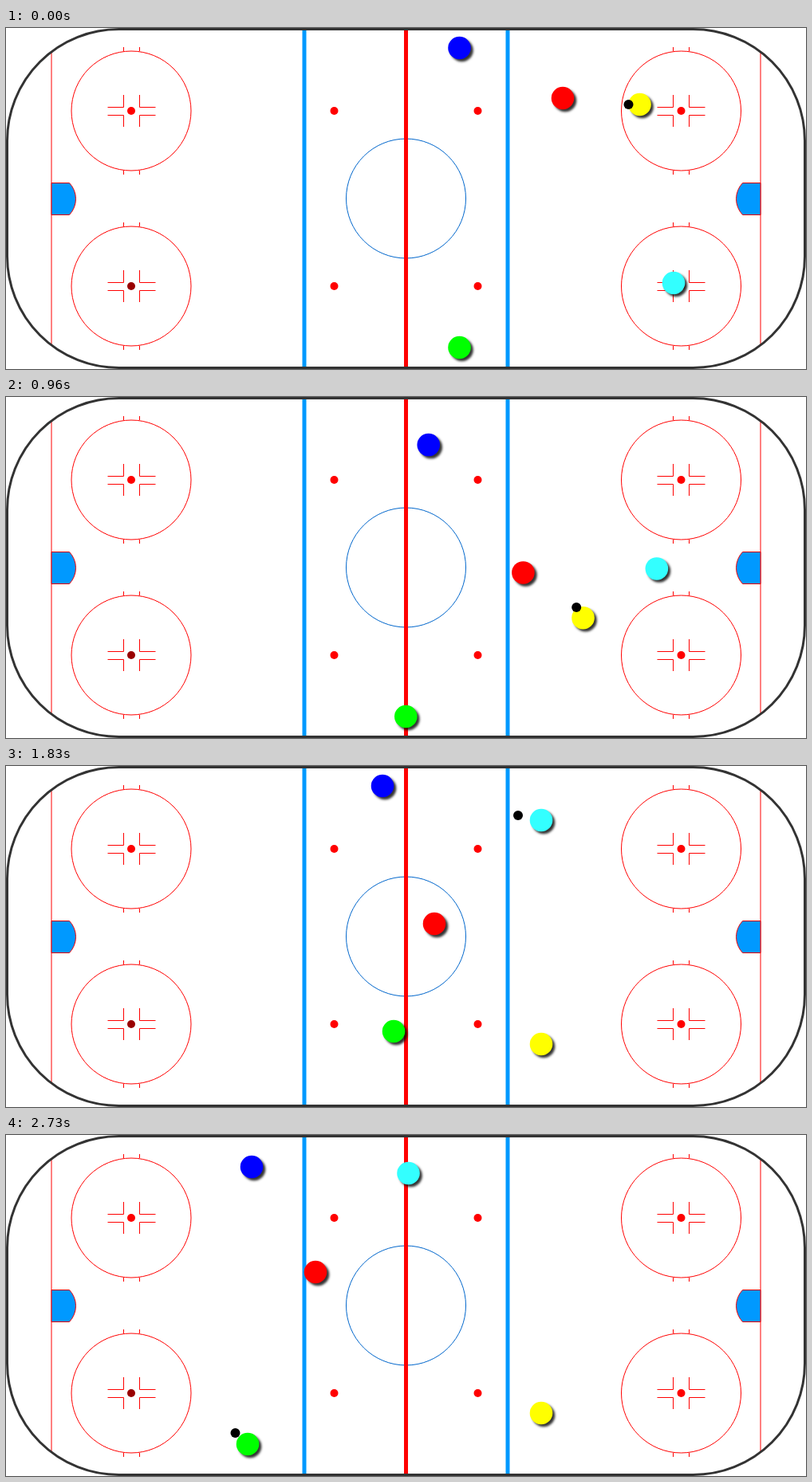
Animation, 1003 px wide and 428 px high, one loop 2850 ms. Source, as an HTML page with a canvas:

```html
<!DOCTYPE html>
<html lang="en">
<head>
<meta charset="utf-8">
<title>Rink drill</title>
<style>
html, body { margin: 0; width: 100%; height: 100%; overflow: hidden; background: #fff; }
canvas { display: block; }
</style>
</head>
<body>
<canvas id="rink" width="1003" height="428"></canvas>
<script>
const ctx = document.getElementById('rink').getContext('2d');
const STEP = 30, LOOP = 2850, LAST = 91;
const RED = '#f00', BLUE = '#09f';

const player = (color, start, ...legs) => ({ color, start, legs });
// A leg runs with constant acceleration: [end step, halfway point, end point]
const blue = player('#00f', [568.5, 25],
  [47, [545, 54], [494, 65]], [61, [484, 50], [472, 25]], [LAST, [403, 21.5], [308, 40]]);
const green = player('#0f0', [568.5, 401],
  [47.5, [522, 401], [456, 401]], [61, [471, 370], [486, 333]],
  [82, [424, 360], [357, 400]], [LAST, [330, 397], [303, 388]]);
const red = player(RED, [698, 88],
  [47, [667, 188], [606, 273]], [61, [573, 235], [537, 198]], [81, [464.5, 168.5], [388, 172]]);
const yellow = player('#ff0', [794.5, 96],
  [44, [756.5, 219], [671, 349]]);
const cyan = player('#3ff', [837, 320],
  [24, [834, 302], [829, 270]], [61, [781, 153], [671, 68]], [81, [592, 50], [504.5, 48]]);
const players = [blue, green, red, yellow, cyan];

// Puck on the stick: [step, carrier, offset]; it is passed straight between carriers
const touches = [
  [0, yellow, [-14, 0]], [34, yellow, [-8, -14]],
  [43, cyan, [-10, -2]], [61, cyan, [-29, -6]],
  [74, red, [2, -5]], [76, red, [2, -5]],
  [LAST - 1, green, [-20, -14]], [LAST, green, [-15.5, -14]]
];

const add = (a, b) => a.map((v, i) => v + b[i]);
const mix = (a, b, u) => a.map((v, i) => v + (b[i] - v) * u);

function playerAt({ start, legs }, t) {
  let from = start, begin = 0;
  for (const [end, half, to] of legs) {
    if (t < end) {
      const u = (t - begin) / (end - begin);
      return from.map((p, i) =>
        p * (1 - u) * (1 - 2 * u) + 4 * half[i] * u * (1 - u) + to[i] * u * (2 * u - 1));
    }
    from = to;
    begin = end;
  }
  return from;
}

function puckAt(t) {
  const next = Math.max(1, touches.findIndex(touch => touch[0] >= t));
  const [t0, giver, offset0] = touches[next - 1], [t1, taker, offset1] = touches[next];
  const u = (t - t0) / (t1 - t0);
  const base = giver === taker ? playerAt(giver, t) : mix(playerAt(giver, t0), playerAt(taker, t1), u);
  return add(base, mix(offset0, offset1, u));
}

function line(x1, y1, x2, y2, color, width = 1) {
  ctx.strokeStyle = color;
  ctx.lineWidth = width;
  ctx.beginPath();
  ctx.moveTo(x1, y1);
  ctx.lineTo(x2, y2);
  ctx.stroke();
}

function disc([x, y], r, color) {
  ctx.fillStyle = color;
  ctx.beginPath();
  ctx.arc(x, y, r, 0, 7);
  ctx.fill();
}

function ring(x, y, r, color) {
  ctx.strokeStyle = color;
  ctx.lineWidth = 1;
  ctx.beginPath();
  ctx.arc(x, y, r, 0, 7);
  ctx.stroke();
}

function faceOff(x, y, dotColor) {
  ring(x, y, 75, RED);
  for (const sx of [-1, 1]) for (const sy of [-1, 1]) {
    const px = Math.floor(x + sx * 10) + 0.5, py = y + sy * 5 + 0.5;
    line(px, y + sy * 75, px, y + sy * 80, RED);
    line(px, py, px + sx * 20, py, RED);
    line(px, py, px, y + sy * 20, RED);
  }
  disc([x, y], 5, dotColor);
}

function goal(x, side) {
  const spread = 0.76, facing = side > 0 ? 0 : Math.PI;
  line(x, 30, x, 398, RED);
  ctx.fillStyle = BLUE;
  ctx.beginPath();
  ctx.moveTo(x, 194.5);
  ctx.arc(x + side * 1.5, 214.5, 29, facing - side * spread, facing + side * spread, side < 0);
  ctx.lineTo(x, 234.5);
  ctx.closePath();
  ctx.fill();
  ctx.stroke();
}

function drawRink() {
  ctx.fillStyle = '#fff';
  ctx.fillRect(0, 0, 1003, 428);
  goal(57, 1);
  goal(946, -1);
  ring(501.5, 214, 75, '#06c');
  line(374, 2, 374, 426, BLUE, 5);
  line(629, 2, 629, 426, BLUE, 5);
  line(501.5, 2, 501.5, 426, RED, 5);
  for (const y of [104, 324]) {
    faceOff(157, y, y > 200 ? '#900' : RED);
    faceOff(846.5, y, RED);
    disc([411.5, y], 5, RED);
    disc([591.5, y], 5, RED);
  }
  ctx.strokeStyle = '#333';
  ctx.lineWidth = 3;
  ctx.beginPath();
  ctx.roundRect(1.5, 1.5, 1000, 425, 140);
  ctx.stroke();
}

function draw(now) {
  const step = Math.min(LAST, Math.floor(now % LOOP / STEP));
  drawRink();
  ctx.save();
  ctx.shadowColor = 'rgba(0,0,0,.8)';
  ctx.shadowOffsetX = ctx.shadowOffsetY = 3;
  ctx.shadowBlur = 3;
  for (const p of players) disc(playerAt(p, step), 14.3, p.color);
  ctx.restore();
  disc(puckAt(step), 6, '#000');
}

const start = performance.now();
function tick() {
  draw(performance.now() - start);
  requestAnimationFrame(tick);
}
tick();
</script>
</body>
</html>
```
